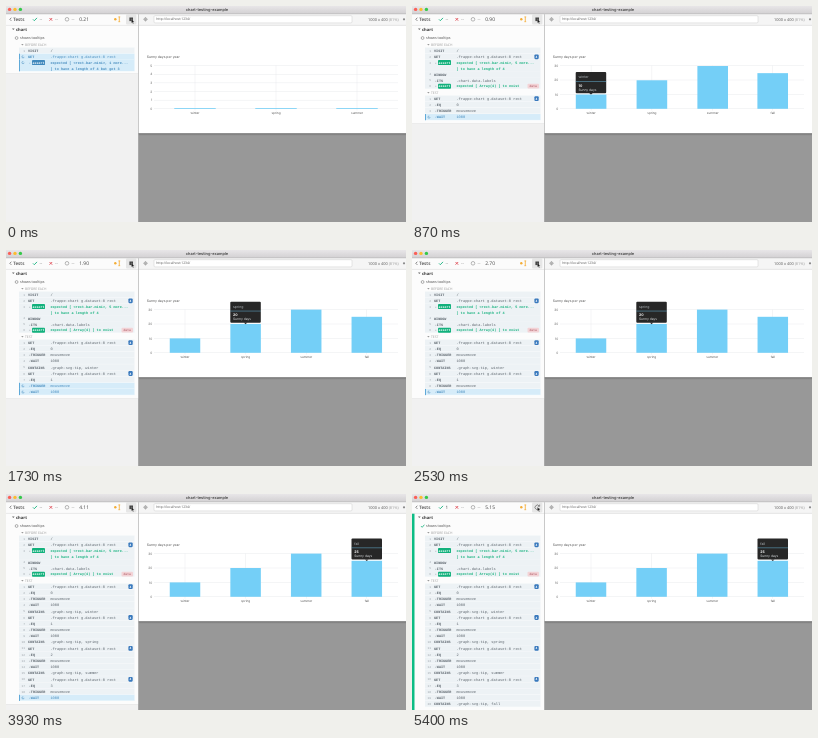
Write an HTML page that moves like this. It is 400 px wide and 216 px high and loops after 5470 ms.

```html
<!DOCTYPE html>
<html lang="en">
<head>
<meta charset="utf-8">
<title>Chart test run</title>
<style>
html, body { margin: 0; width: 100%; height: 100%; overflow: hidden; background: #fcfcfc; }
svg { display: block; width: 100vw; height: 100vh; text-rendering: geometricPrecision; }
text { font-family: "Open Sans", "Noto Sans", sans-serif; }
.mono { font-family: "Liberation Mono", "DejaVu Sans Mono", monospace; }
.ui { font-family: Inter, Roboto, sans-serif; }
.bold { font-weight: 700; }
.semi { font-weight: 600; }
.mid { text-anchor: middle; }
.end { text-anchor: end; }
</style>
</head>
<body>
<svg id="stage" viewBox="0 0 400 216"></svg>
<script>
const LOOP = 5470;
const LOADED = 400;                 // the data arrives and the bars start to grow
const PASSED = 4930;
const SEASONS = ['winter', 'spring', 'summer', 'fall'];
const DAYS = [10, 20, 30, 25];
const HOVERS = [670, 1690, 2750, 3820, 4930];
const CLOCK = [[0, .21], [870, .9], [1730, 1.9], [3130, 3.3], [3930, 4.11], [4800, 5], [PASSED, 5.15]];
const BASE = 102.8, PITCH = 6.18;
const BLUE = '#74cff7', GREEN = '#12b17c', PENDING = '#4189bd';

const mix = (a, b, p) => a + (b - a) * p;
const clamp = v => Math.max(0, Math.min(1, v));

const rect = (x, y, w, h, fill, extra = '') =>
  `<rect x="${x}" y="${y}" width="${w}" height="${h}" fill="${fill}" ${extra}/>`;
const path = (d, stroke, width = .6, fill = 'none') =>
  `<path d="${d}" stroke="${stroke}" stroke-width="${width}" fill="${fill}"/>`;
const dot = (x, y, r, fill, extra = '') =>
  `<circle cx="${x}" cy="${y}" r="${r}" fill="${fill}" ${extra}/>`;
// y is the vertical middle of the capitals
const text = (x, y, s, size, fill, cls = '') =>
  `<text x="${x}" y="${y + size * .35}" font-size="${size}" fill="${fill}" class="${cls}">${s}</text>`;

function clock(t) {
  const i = CLOCK.findIndex(k => k[0] > t);
  if (i < 0) return '5.15';
  const [t0, v0] = CLOCK[i - 1], [t1, v1] = CLOCK[i];
  return mix(v0, v1, (t - t0) / (t1 - t0)).toFixed(2);
}

function titleBar() {
  return rect(0, 0, 400, 8, 'url(#bar)') + rect(0, 7.6, 400, .6, '#b2b2b2') +
    dot(3.6, 3.4, 1.7, '#fb5f57') + dot(9, 3.4, 1.7, '#fcbc30') + dot(14.4, 3.4, 1.7, '#35c84a') +
    text(201, 3.7, 'chart-testing-example', 3.9, '#444', 'ui mid semi');
}

function toolbar(t) {
  const passed = t >= PASSED;
  const button = passed
    ? path('M127.2 12A2.3 2.3 0 1 0 127.5 14.2M127.6 10.6V12.3H125.9', '#666', .7)
    : rect(123.4, 11.5, 3.6, 3.6, '#444');
  return rect(0, 8.2, 132.2, 11, '#fbfbfb') + rect(0, 18.9, 132.2, .6, '#ddd') +
    path('M5.4 11.7L3.8 13.3L5.4 14.9', '#555', .7) +
    text(7.2, 13.3, 'Tests', 4.6, '#444', 'semi') +
    path('M27 13.4L28.3 14.7L31 11.9', GREEN, .9) +
    text(33.4, 13.3, passed ? '1' : '--', 4.6, passed ? '#444' : '#888') +
    path('M43.5 12L46.2 14.7M46.2 12L43.5 14.7', '#e0505a', .9) +
    text(49, 13.3, '--', 4.6, '#888') +
    dot(61, 13.3, 1.8, 'none', 'stroke="#888" stroke-width=".6"') +
    text(65.5, 13.3, '--', 4.6, '#888') +
    text(73.2, 13.2, clock(t), 4.95, '#444') +
    dot(109.3, 13.3, 1.2, '#f4ad35') +
    path('M113.3 10.9V15.7M112.4 10.9H114.2M112.4 15.7H114.2', '#f4ad35', .8) +
    rect(120, 8.6, 10.4, 10, '#e6e6e6', 'rx="1"') + button +
    path('M125.4 13V17L126.3 16.2L127 17.7L127.7 17.4L127.1 15.9H128.3Z', '#fff', .25, '#111');
}

function browserBar() {
  return rect(132.6, 8.2, 267.4, 11, '#f5f5f5') + rect(132.6, 18.9, 267.4, .6, '#d5d5d5') +
    dot(139.5, 13.3, 1.4, 'none', 'stroke="#777" stroke-width=".5"') +
    path('M139.5 11.1V15.5M137.3 13.3H141.7', '#777', .35) +
    rect(148, 9.7, 198, 7.2, '#fff', 'stroke="#ccc" stroke-width=".5" rx="1"') +
    text(150.2, 13.3, 'http://localhost:1234/', 3.4, '#555') +
    text(362, 13.3, '1000 x 400 <tspan fill="#999">(81%)</tspan>', 3.9, '#555') +
    dot(398, 13.3, 1.1, '#888');
}

function commands(t) {
  const list = [];
  HOVERS.slice(0, 4).forEach((at, i) => {
    const add = (time, done, label, message) => list.push({ time, done, label, message });
    add(at - 60, at - 45, 'GET', '.frappe-chart g.dataset-0 rect');
    add(at - 45, at - 25, '-EQ', i);
    add(at - 25, at + 60, '-TRIGGER', 'mousemove');
    add(at, HOVERS[i + 1] - 80, '-WAIT', '1000');
    add(HOVERS[i + 1] - 80, HOVERS[i + 1] - 60, 'CONTAINS', '.graph-svg-tip, ' + SEASONS[i]);
  });
  return list.filter(c => t >= c.time);
}

function row(y, n, label, message, pending, height = PITCH) {
  const color = pending ? PENDING : '#59626a';
  const top = y - PITCH / 2;
  const mark = pending
    ? rect(13, top, 1, height, '#5fa9d8') +
      dot(17, y, 1.1, 'none', `stroke="${PENDING}" stroke-width=".5" stroke-dasharray="5 2"`)
    : text(19, y, n, 3, '#9aa2a8', 'mono end');
  const child = label[0] === '-';
  return rect(13, top, 115.5, height, pending ? '#d6ecf9' : '#edf2f5') +
    rect(13, top + height - .3, 115.5, .3, '#fff') + mark +
    text(child ? 22.8 : 22, y, label, 3.45, color, 'mono semi') +
    text(44.4, y, message, 3.65, color, 'mono');
}

const pill = (x, y, w, s, fill) =>
  rect(x, y - 2.5, w, 5, fill, 'rx=".9"') + text(x + w / 2, y, s, 3.3, '#fff', 'mono bold mid');

const badge = y => rect(122.4, y - 2.4, 4.3, 4.8, '#3979bd', 'rx="1.1"') +
  text(124.5, y, '4', 3.1, '#fff', 'mid bold');

function assertion(y, n, lines, pending) {
  const color = pending ? PENDING : GREEN;
  return row(y, n, '-', '', pending, lines.length * 5.9) + pill(26, y, 13, 'assert', color) +
    lines.map((s, i) => text(44.4, y + i * 5.9, s, 3.5, color, 'mono bold')).join('');
}

const heading = (y, s) => path(`M15.2 ${y - .6}H17.6L16.4 ${y + .9}Z`, 'none', 0, '#999') +
  text(19, y, s, 3.3, '#999');

function reporter(t) {
  const passed = t >= PASSED, waiting = t < LOADED;
  const steps = commands(t);
  const bottom = waiting ? 67.5 : steps.length ? 92.6 + steps.length * PITCH : 86;
  let out = rect(0, 19.4, 132.2, 197, '#f1f1f1') +
    rect(0, 19.4, 132.2, bottom - 19.4, '#fcfcfc') + rect(0, bottom, 132.2, .5, '#e2e2e2') +
    path('M6 22.4H8.6L7.3 24.1Z', 'none', 0, '#666') +
    text(10, 23.1, 'chart', 4.1, '#333', 'bold') +
    text(14, 32, 'shows tooltips', 3.65, '#444') +
    (passed
      ? rect(0, 19.4, 2.5, 197, '#0dbd85') + path('M9 32.1L10.2 33.3L12.4 30.7', GREEN, .8)
      : dot(10.6, 32, 1.4, 'none', 'stroke="#777" stroke-width=".6"')) +
    heading(38.5, 'BEFORE EACH') +
    row(44.6, 1, 'VISIT', '/', false) +
    row(50.8, 2, 'GET', '.frappe-chart g.dataset-0 rect', waiting) +
    assertion(56.6, 3, [
      `expected [ &lt;rect.bar.mini&gt;, ${waiting ? 1 : 5} more...`,
      '] to have a length of 4' + (waiting ? ' but got 3' : '')
    ], waiting);
  if (waiting) return out;

  out += badge(50.8);
  if (t >= 450) out += row(68.3, 4, 'WINDOW', '', false);
  if (t >= 480) out += row(74.3, 5, '-ITS', '.chart.data.labels', false);
  if (t >= 510) out += assertion(80.2, 6, ['expected [ Array(4) ] to exist'], false) +
    rect(115.5, 77.8, 11.5, 4.8, '#f3d3d6', 'rx="1"') + text(121.2, 80.2, 'data', 3.1, '#a8505c', 'mono mid');
  if (steps.length) out += heading(86.5, 'TEST');
  steps.forEach((c, i) => {
    const y = 92.6 + i * PITCH;
    out += row(y, i + 1, c.label, c.message, t < c.done);
    if (c.label === 'GET') out += badge(y);
  });
  return out;
}

function tooltip(i) {
  const x = 163.7 + i * 60.6, y = BASE - DAYS[i] * 1.44 - 22.3;
  return rect(x, y, 30.5, 21.1, '#272727', 'rx="1"') +
    path(`M${x + 13.5} ${y + 20.9}H${x + 17}L${x + 15.25} ${y + 22.5}Z`, 'none', 0, '#272727') +
    rect(x, y + 9, 30.5, .7, BLUE, 'opacity=".6"') +
    text(x + 2.7, y + 4.9, SEASONS[i], 3.5, '#aeb4b9', 'ui') +
    text(x + 2.7, y + 13.2, DAYS[i], 3.5, '#fff', 'ui bold') +
    text(x + 2.7, y + 17.5, 'Sunny days', 3.3, '#d5d8da', 'ui');
}

function chart(t) {
  const loaded = t >= LOADED;
  const p = clamp((t - LOADED) / 500), grow = p * p * (3 - 2 * p);
  const steps = loaded ? 3 : 5;
  const bars = SEASONS.slice(0, loaded ? 4 : 3).map((name, i) => ({
    name,
    x: mix(189 + Math.min(i, 2) * 81, 179 + i * 60.6, grow),
    w: mix(41.5, 30.5, grow),
    h: Math.max(.8, DAYS[i] * 1.44 * grow)
  }));
  let out = rect(132.6, 19.4, 267.4, 107.8, '#fff') +
    text(140.8, 51, 'Sunny days per year', 3.4, '#555', 'ui');
  for (let i = 0; i <= steps; i++) {
    const y = BASE - i * 43.2 / steps;
    out += rect(148, y - .2, 244, .4, '#e3e6e8') +
      text(146.2, y, loaded ? i * 10 : i, 3.2, '#666', 'ui end');
  }
  for (const b of bars) {
    out += rect(b.x - .2, BASE - 43.2, .4, 45, '#e3e6e8') +
      rect(b.x - b.w / 2, BASE - b.h, b.w, b.h, BLUE) +
      text(b.x, 106.8, b.name, 3.1, '#555', 'ui mid');
  }
  const hovered = HOVERS.slice(0, 4).filter(at => t >= at).length - 1;
  return hovered < 0 ? out : out + tooltip(hovered);
}

const DEFS = `<defs>
  <linearGradient id="bar" x2="0" y2="1"><stop stop-color="#e8e6e8"/><stop offset="1" stop-color="#d2d0d2"/></linearGradient>
  <linearGradient id="shade" x2="0" y2="1"><stop stop-color="#6c6c6c"/><stop offset="1" stop-color="#989898"/></linearGradient>
</defs>`;
const stage = document.getElementById('stage');

function draw(now) {
  const t = now % LOOP;
  stage.innerHTML = DEFS + rect(132, 127, 268, 89, '#989898') + rect(132, 127, 268, 2.8, 'url(#shade)') +
    chart(t) + reporter(t) + browserBar() + toolbar(t) + titleBar() +
    rect(132.1, 8.2, .6, 208, '#a8a8a8');
}

const start = performance.now();
function tick() {
  draw(performance.now() - start);
  requestAnimationFrame(tick);
}
tick();
</script>
</body>
</html>
```
